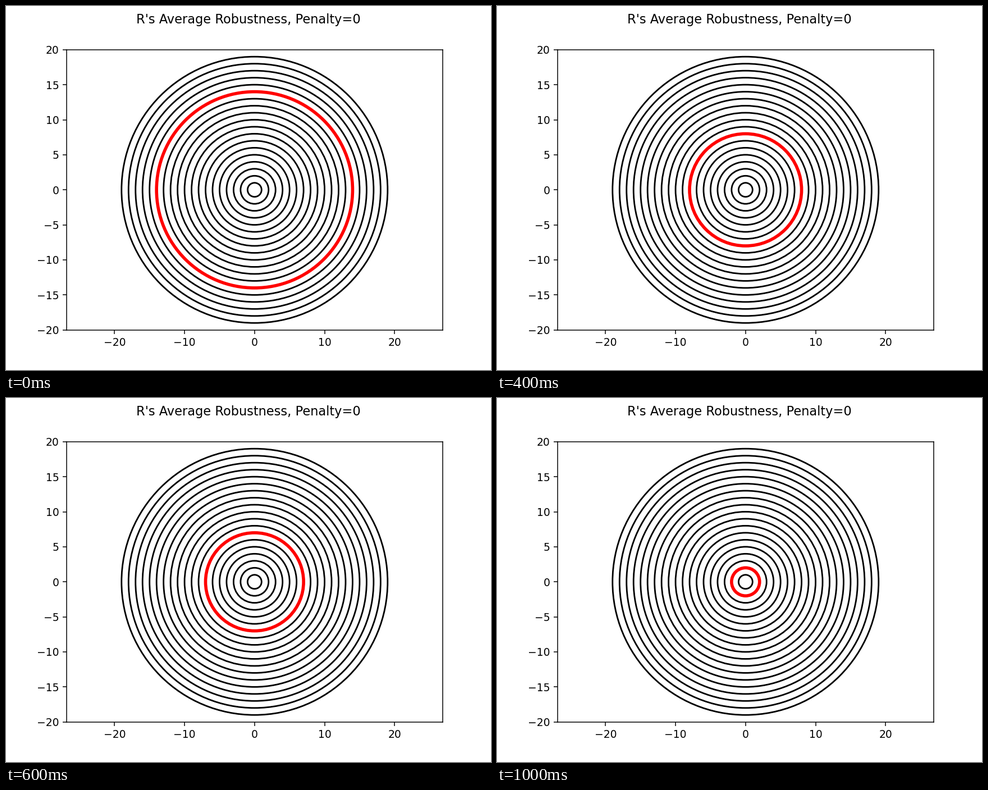
A matplotlib script that plays this animation: 864x648 px, repeating every 1.2 s.

```python
import matplotlib.pyplot as plt
from matplotlib.animation import FuncAnimation
from matplotlib.patches import Circle

DPI = 135
Y_LIMIT = 20
HIGHLIGHTED_RADII = [14, 12, 8, 7, 5, 2]

plt.rcParams["font.family"] = "DejaVu Sans"
fig, ax = plt.subplots(figsize=(864 / DPI, 648 / DPI), dpi=DPI)
fig.subplots_adjust(left=0.125, right=0.9, bottom=0.11, top=0.88)
fig.suptitle("R's Average Robustness, Penalty=0", fontsize=12)

# Equal scale on both axes
box = ax.get_window_extent()
x_limit = Y_LIMIT * box.width / box.height
ax.set_xlim(-x_limit, x_limit)
ax.set_ylim(-Y_LIMIT, Y_LIMIT)
ax.set_xticks(range(-20, 21, 10))
ax.set_yticks(range(-20, 21, 5))

rings = {r: ax.add_patch(Circle((0, 0), r, fill=False)) for r in range(1, Y_LIMIT)}


def update(frame):
    for radius, ring in rings.items():
        active = radius == HIGHLIGHTED_RADII[frame]
        ring.set(edgecolor="red" if active else "black",
                 linewidth=3 if active else 1.5)
    return list(rings.values())


anim = FuncAnimation(fig, update, frames=len(HIGHLIGHTED_RADII),
                     interval=200, repeat=True, repeat_delay=0)
plt.show()
```
